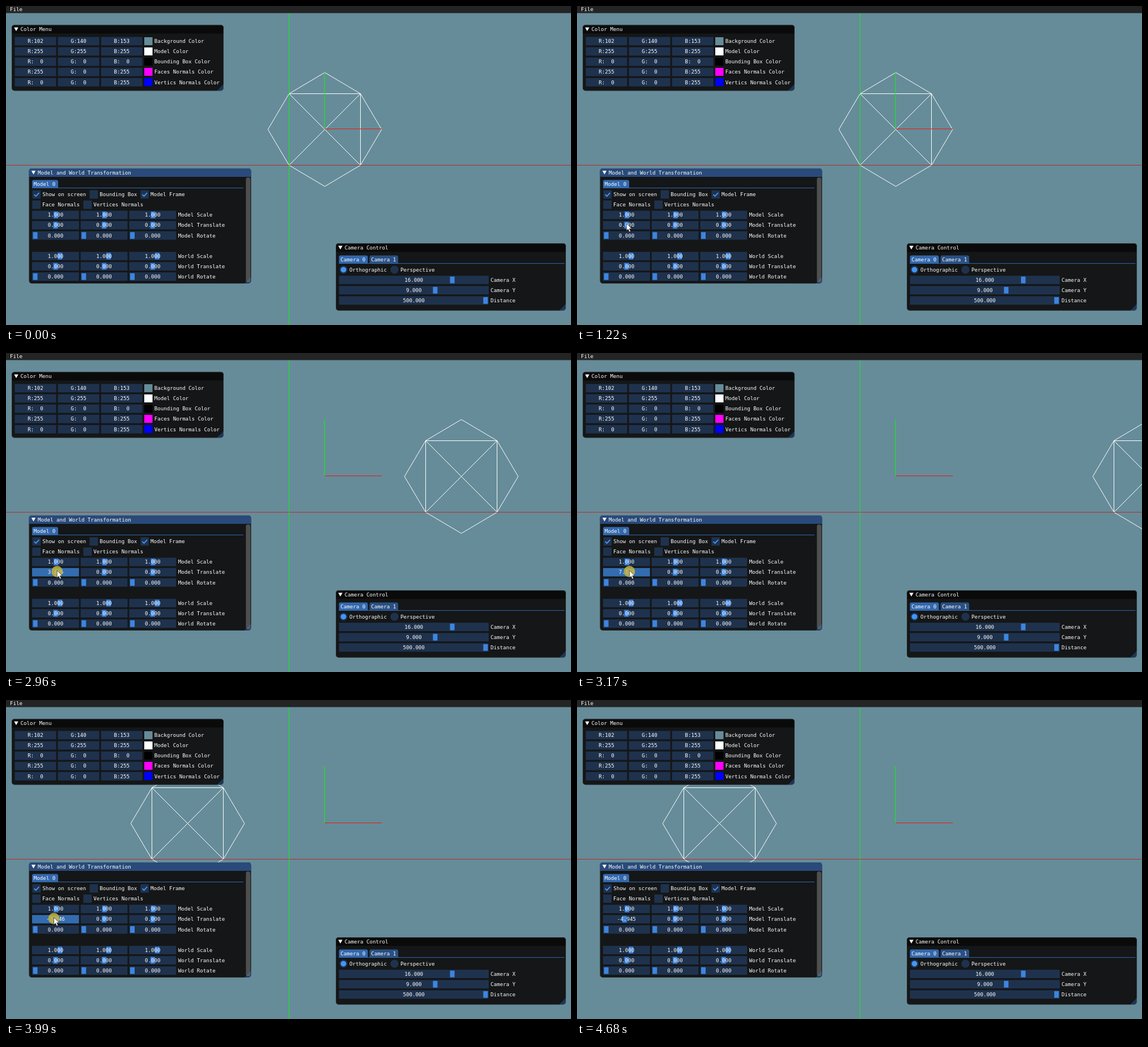
An HTML page that plays this animation: 997x562 px, repeating every 4.89 s.

```html
<!DOCTYPE html>
<html lang="en">
<head>
<meta charset="utf-8">
<title>Model viewer</title>
<style>
  html, body { margin: 0; width: 100%; height: 100%; overflow: hidden; background: #668c99; }
  svg { display: block; width: 997px; height: 562px; }
  text { font: 9.14px "DejaVu Sans Mono", monospace; fill: #fff; white-space: pre; }
</style>
</head>
<body>
<svg id="stage" viewBox="0 0 997 562"></svg>
<script>
const LOOP = 4890;
const ROW = 18.1;          // line pitch of the panels
const UNIT = 50 / 91;      // slider value per mouse notch
const SHIFT = 34.47;       // model travel per notch, px
const FRAME = '#1f324d', ACTIVE = '#336cb0', HOVER = '#264972';
const GRAB = '#3d85e0', BLUE = '#4296fa', TAB = '#3368ad';
const RED = '#f41414', GREEN = '#10ee18';

const stage = document.getElementById('stage');

function add(tag, attrs, parent = stage) {
  const el = document.createElementNS('http://www.w3.org/2000/svg', tag);
  for (const key in attrs) el.setAttribute(key, attrs[key]);
  return parent.appendChild(el);
}
const box = (x, y, width, height, fill, more) => add('rect', { x, y, width, height, fill, ...more });
const path = (d, attrs, parent) => add('path', { d, fill: 'none', ...attrs }, parent);
const line = (d, stroke, width = 1) => path(d, { stroke, 'stroke-width': width });

function label(str, x, cy, anchor = 'start') {
  const el = add('text', { x, y: cy + 3.2, 'text-anchor': anchor });
  el.textContent = str;
  return el;
}

function panel(x, y, w, h, title, bar) {
  box(x, y, w, h, '#141617', { rx: 5 });
  path(`M${x} ${y + 15}v-10q0-5 5-5h${w - 10}q5 0 5 5v10z`, { fill: bar });
  box(x + .4, y + .4, w - .8, h - .8, 'none', { rx: 4.6, stroke: '#6e6e80', 'stroke-opacity': .35, 'stroke-width': .8 });
  path(`M${x + 4.3} ${y + 4.3}h7.4l-3.7 6.4z`, { fill: '#fff' });
  label(title, x + 15.5, y + 7.3);
}

const grip = (right, bottom) =>
  path(`M${right} ${bottom - 12}v8q0 4-4 4h-8z`, { fill: BLUE, 'fill-opacity': .25 });

function tab(str, x, w, cy, fill) {
  path(`M${x} ${cy + 7.2}v-11.4q0-3 3-3h${w - 6}q3 0 3 3v11.4z`, { fill });
  label(str, x + 2.7, cy);
}

function slider(x, w, cy, value, part) {
  const bar = box(x, cy - 7.4, w, 14.8, FRAME);
  const knob = box(0, cy - 5.9, 8, 11.8, GRAB);
  const place = f => knob.setAttribute('x', x + 1.6 + f * (w - 11.2));
  place(part);
  return { bar, knob, place, text: label(value, x + w / 2, cy, 'middle') };
}

function checkbox(str, x, cy, on) {
  box(x, cy - 7.4, 14.8, 14.8, FRAME);
  if (on) line(`M${x + 3.2} ${cy + .2}l3 3 5.6-6`, BLUE, 1.9);
  label(str, x + 17.8, cy);
}

function radio(str, cx, cy, on) {
  add('circle', { cx, cy, r: 7.2, fill: FRAME });
  if (on) add('circle', { cx, cy, r: 4.9, fill: BLUE });
  label(str, cx + 10.5, cy);
}

// Outer ring of eight points; every second one is a corner of the square
function wireframe(cx, cy, tip, half) {
  const ring = Array.from({ length: 8 }, (_, i) => {
    const r = i % 2 ? half * Math.SQRT2 : tip, a = i * Math.PI / 4;
    return `${cx + r * Math.cos(a)} ${cy + r * Math.sin(a)}`;
  });
  const [a, b, c, d] = ring.filter((_, i) => i % 2);
  return `M${ring.join('L')}ZM${a}L${b}L${c}L${d}ZM${a}L${c}M${b}L${d}`;
}

// Scene
box(0, 0, 997, 562, '#668c99');
const model = line(wireframe(562.5, 217.5, 100.3, 63), '#fff');
line('M562 216.5H663', RED, 1.2);
line('M562 217V117', GREEN, 1.2);
line('M0 280.5H997', '#b82a28');
line('M499.5 12V562', GREEN);

// Menu bar
box(0, 0, 997, 12.5, '#242424');
label('File', 7, 5.8);

// Colors
panel(10, 33.5, 374, 116, 'Color Menu', '#0a0a0a');
grip(384, 149.5);
Object.entries({
  'Background': [102, 140, 153],
  'Model': [255, 255, 255],
  'Bounding Box': [0, 0, 0],
  'Faces Normals': [255, 0, 255],
  'Vertics Normals': [0, 0, 255]
}).forEach(([name, rgb], row) => {
  const cy = 61.9 + row * ROW;
  rgb.forEach((v, i) => {
    const x = 15.5 + i * 76.1;
    box(x, cy - 7.4, 73, 14.8, FRAME);
    label('RGB'[i] + ':' + String(v).padStart(3), x + 36.5, cy, 'middle');
  });
  box(244, Math.round(cy - 7), 14.5, 14, `rgb(${rgb})`);
  label(name + ' Color', 261.7, cy);
});

// Transformations
panel(40.5, 286, 392, 203, 'Model and World Transformation', '#294a7a');
box(423.3, 302, 7.8, 185, '#4f4f4f', { rx: 3.9 });
grip(432.5, 489);
tab('Model 0', 46, 46, 313.8, TAB);
line('M46 320.6H419', TAB);
checkbox('Show on screen', 46.5, 332, true);
checkbox('Bounding Box', 147.5, 332, false);
checkbox('Model Frame', 237.3, 332, true);
checkbox('Face Normals', 46.3, 350, false);
checkbox('Vertices Normals', 136.5, 350, false);

const triples = {};
['Model', 'World'].forEach((space, s) => {
  const kinds = { Scale: s ? .61 : .51, Translate: .5, Rotate: 0 };
  Object.entries(kinds).forEach(([kind, part], k) => {
    const name = `${space} ${kind}`, cy = 368.1 + (s * 4 + k) * ROW;
    const value = kind === 'Scale' ? '1.000' : '0.000';
    triples[name] = [0, 1, 2].map(i => slider(46 + i * 85.7, 82.8, cy, value, part));
    label(name, 303.8, cy);
  });
});
const drag = triples['Model Translate'][0];

// Camera
panel(582, 418.2, 406, 118.5, 'Camera Control', '#0a0a0a');
grip(988, 536.7);
tab('Camera 0', 587.5, 51, 446.8, TAB);
tab('Camera 1', 641.5, 50.5, 446.8, '#2a5083');
line('M587.5 453.6H985.5', TAB);
radio('Orthographic', 595.5, 464.6, true);
radio('Perspective', 685.5, 464.6, false);
const [, camY] = [
  ['Camera X', '16.000', .768],
  ['Camera Y', '9.000', .649],
  ['Distance', '500.000', 1]
].map(([name, value, part], i) => {
  const cy = 482.6 + i * ROW;
  label(name, 855, cy);
  return slider(587.5, 264.3, cy, value, part);
});

// Pointer
const pointer = add('g', {});
const halo = add('circle', { cx: 0, cy: 2, r: 10, fill: '#c2b23c', 'fill-opacity': .85 }, pointer);
path('M0 0V12.8L2.9 10.2 5 15 7.2 14 5.1 9.4H9.2Z',
  { fill: '#fff', stroke: '#222', 'stroke-width': .7 }, pointer);

const mix = (a, b, p) => a + (b - a) * p;
const smooth = p => p * p * (3 - 2 * p);

// Progress 0..1 in equal held steps, the first at `from`, the last at `to`
function steps(t, from, to, count) {
  const done = Math.floor((t - from) / (to - from) * (count - 1)) + 1;
  return Math.min(Math.max(done, 0), count) / count;
}

const notches = t => Math.round(
  -steps(t, 1620, 1690, 2)
  + 6 * steps(t, 2420, 2500, 2)
  + 8 * steps(t, 2960, 3170, 4)
  - 22 * steps(t, 3500, 4060, 9));

function pointerAt(t, n) {
  const come = smooth(steps(t, 550, 950, 7));
  const settle = steps(t, 1020, 1220, 4);
  const leave = smooth(steps(t, 4330, 4610, 5));
  const x = mix(mix(377, 100, come), 87.3 + n * .4, settle);
  const y = mix(mix(523, 388, come), 383, settle);
  return [mix(x, 773, leave), mix(y, 468, leave) - 78 * Math.sin(Math.PI * leave)];
}

function draw(t) {
  const n = notches(t);
  const pressed = t >= 1620 && t < 4260;
  model.setAttribute('transform', `translate(${Math.floor(n * SHIFT)} 0)`);
  drag.text.textContent = (n * UNIT).toFixed(3);
  drag.bar.setAttribute('fill', pressed ? ACTIVE : FRAME);
  drag.knob.setAttribute('fill', pressed ? BLUE : GRAB);
  drag.place(.5 + n * UNIT / 100);
  camY.bar.setAttribute('fill', t >= 4610 && t < 4680 ? HOVER : FRAME);

  pointer.setAttribute('visibility', t >= 480 && t < 4680 ? 'visible' : 'hidden');
  pointer.setAttribute('transform', `translate(${pointerAt(t, n)})`);
  halo.setAttribute('opacity', pressed ? 1 : 0);
}

const start = performance.now();
function tick() {
  draw((performance.now() - start) % LOOP);
  requestAnimationFrame(tick);
}
tick();
</script>
</body>
</html>
```
